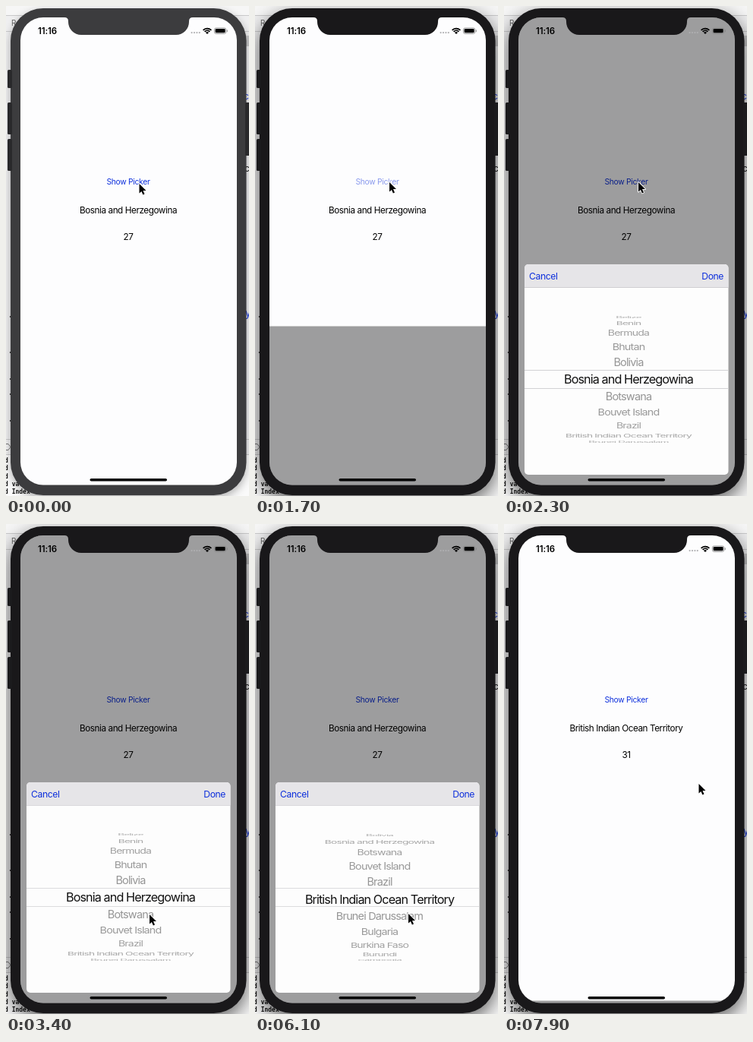
Recreate the animation shown at these times as an HTML page with a canvas. Size 320 by 645 pixels, loop 8 s.

```html
<!DOCTYPE html>
<html lang="en">
<head>
<meta charset="utf-8">
<title>Country picker</title>
<style>
  html, body { margin: 0; width: 100%; height: 100%; overflow: hidden; background: #eee; }
  canvas { display: block; width: 320px; height: 645px; }
</style>
</head>
<body>
<canvas id="stage"></canvas>
<script>
const LOOP = 8000, W = 320, H = 645;
const SANS = 'Inter, "Open Sans", sans-serif', MONO = '"DejaVu Sans Mono", monospace';
const BLUE = '#0e30dc';
const canvas = document.getElementById('stage');
const ctx = canvas.getContext('2d');
const dpr = window.devicePixelRatio || 1;
canvas.width = W * dpr;
canvas.height = H * dpr;

const countries = ['Belize', 'Benin', 'Bermuda', 'Bhutan', 'Bolivia', 'Bosnia and Herzegowina',
  'Botswana', 'Bouvet Island', 'Brazil', 'British Indian Ocean Territory', 'Brunei Darussalam',
  'Bulgaria', 'Burkina Faso', 'Burundi', 'Cambodia'];
const FIRST = 5, LAST = 9;

// Keys are [time, ...values]
const pointerKeys = [[0, 175.5, 234], [1000, 175.5, 234], [1100, 177, 232], [2400, 177, 232],
  [3300, 189, 514], [4000, 189, 514], [4400, 194, 534], [6000, 202, 513], [6500, 202, 513],
  [7300, 272, 357], [7600, 272, 357], [7900, 256.5, 342]];
const scrollKeys = [[4500, 0], [6100, 3.89], [6300, 4]];
const buttonKeys = [[1500, 1], [1501, 0.3], [1600, 0.3], [1900, 1]];

function track(keys, t) {
  if (t <= keys[0][0]) return keys[0].slice(1);
  const i = keys.findIndex(k => k[0] > t);
  if (i < 0) return keys[keys.length - 1].slice(1);
  const a = keys[i - 1], b = keys[i];
  const u = (t - a[0]) / (b[0] - a[0]), e = u * u * (3 - 2 * u);
  return a.slice(1).map((v, j) => v + (b[j + 1] - v) * e);
}

// Remaining distance of a critically damped spring, from 1 to 0
function spring(ms, rate) {
  const x = Math.max(0, ms) / 1000 * rate;
  return (1 + x) * Math.exp(-x);
}

function sheetOffset(t) {
  return 616 * (t < 5000 ? spring(t - 1630, 17) : 1 - spring(t - 7658, 30));
}

function box(x, y, w, h, color, r = 0) {
  ctx.fillStyle = color;
  ctx.beginPath();
  ctx.roundRect(x, y, w, h, r);
  ctx.fill();
}

function text(str, x, y, size, color, { align = 'center', weight = 400, track = -0.035, font = SANS } = {}) {
  ctx.font = `${weight} ${size}px ${font}`;
  ctx.letterSpacing = size * track + 'px';
  ctx.textAlign = align;
  ctx.fillStyle = color;
  ctx.fillText(str, x, y + size * 0.36);
}

function clipped(shape, draw, rule = 'nonzero') {
  ctx.save();
  ctx.beginPath();
  shape();
  ctx.clip(rule);
  draw();
  ctx.restore();
}

function desktop() {
  box(0, 0, W, H, '#efeff0');
  box(0, 0, W, 12, '#f6f6f6');
  for (const y of [12, 33, 570, 590]) box(0, y, W, 1, '#c9c9ca');
  box(0, 591, W, 54, '#fafafa');
  text('R', 10, 22, 10, '#666');
  box(316, 39, 4, 14, '#c8c8c9');
  const right = { align: 'left' };
  text('cl', 313, 119, 12, BLUE, right);
  text('c', 314, 214, 12, '#111', right);
  text('y', 315, 404, 13, BLUE, right);
  for (const y of [408, 455, 490, 510, 545]) box(5, y, 2, 2, '#444');
  ctx.strokeStyle = '#777';
  ctx.beginPath();
  ctx.moveTo(0, 576.5);
  ctx.lineTo(3, 576.5);
  ctx.lineTo(6, 580.5);
  ctx.lineTo(3, 584.5);
  ctx.lineTo(0, 584.5);
  ctx.stroke();
  ['d', 'd', 'd', 'd va', 'd Index'].forEach((line, i) =>
    text(line, -2, 598 + i * 10.4, 8, '#111', { align: 'left', weight: 700, track: 0, font: MONO }));
}

function phoneBody(active) {
  const color = active ? '#19181a' : '#3c3c3e';
  const keys = active ? '#1b1b1d' : '#29292b';
  ctx.save();
  ctx.shadowColor = active ? 'rgba(0,0,0,.62)' : 'rgba(0,0,0,.3)';
  ctx.shadowBlur = (active ? 26 : 12) * dpr;
  ctx.shadowOffsetY = (active ? 9 : 4) * dpr;
  box(6, 3, 310.5, 641, color, 43);
  ctx.restore();
  box(2, 84, 6, 24, keys, 1.5);
  box(2, 127, 6, 42, keys, 1.5);
  box(2, 175, 6, 42, keys, 1.5);
  box(315, 127, 6, 70, keys, 1.5);
  return color;
}

function notch(color) {
  ctx.fillStyle = color;
  ctx.beginPath();
  ctx.moveTo(77, 14);
  ctx.lineTo(77, 15);
  ctx.quadraticCurveTo(82, 15, 82, 20);
  ctx.arcTo(82, 38, 98, 38, 17);
  ctx.arcTo(241, 38, 241, 20, 17);
  ctx.lineTo(241, 20);
  ctx.quadraticCurveTo(241, 15, 246, 15);
  ctx.lineTo(246, 14);
  ctx.fill();
}

function statusBar() {
  text('11:16', 54.5, 32.5, 11.5, '#000', { weight: 600, track: -0.01 });
  for (let i = 0; i < 4; i++) box(243.5 + i * 3.4, 34, 2.2, 2.2, '#b0b0b2', 1.1);
  ctx.strokeStyle = '#000';
  ctx.lineWidth = 1.7;
  for (const r of [4.6, 7.4]) {
    ctx.beginPath();
    ctx.arc(265, 37, r, -Math.PI * 0.76, -Math.PI * 0.24);
    ctx.stroke();
  }
  ctx.fillStyle = '#000';
  ctx.beginPath();
  ctx.moveTo(265, 37);
  ctx.arc(265, 37, 2.8, -Math.PI * 0.76, -Math.PI * 0.24);
  ctx.fill();
  ctx.lineWidth = 0.8;
  ctx.strokeStyle = '#888';
  ctx.beginPath();
  ctx.roundRect(274.4, 28.9, 15.4, 7.6, 2.3);
  ctx.stroke();
  box(275.6, 30.1, 13, 5.2, '#000', 1.2);
  box(290.7, 31.2, 1, 3, '#888', 0.5);
}

function wheelRows(scroll, magnified) {
  countries.forEach((name, i) => {
    const angle = (i - FIRST - scroll) * 0.271;
    const c = Math.cos(angle);
    if (Math.abs(angle) > 1.5) return;
    const scale = magnified ? 1 : 0.896 * (1 - 0.104 * (1 - c));
    ctx.save();
    ctx.translate(164, 491.5 + 84 * Math.sin(angle));
    ctx.scale(scale, scale * c);
    const color = magnified ? '#111' : `rgba(0,0,0,${0.28 + 0.14 * c})`;
    text(name, 0, 0, 16.2, color, { track: -0.056 });
    ctx.restore();
  });
}

function pickerCard(scroll) {
  clipped(() => ctx.roundRect(27, 340, 268.5, 277, 5), () => {
    box(27, 340, 269, 277, '#fdfdfd');
    box(27, 340, 269, 30, '#e6e5e8');
    box(27, 370, 269, 0.8, '#cfced2');
    text('Cancel', 33, 355.5, 12.2, BLUE, { align: 'left' });
    text('Done', 289, 355.5, 12.2, BLUE, { align: 'right' });
    const band = () => ctx.rect(27, 479.5, 269, 24);
    clipped(() => { ctx.rect(27, 371, 269, 246); band(); }, () => wheelRows(scroll, false), 'evenodd');
    clipped(band, () => wheelRows(scroll, true));
    box(27, 479, 269, 0.8, '#d2d2d4');
    box(27, 503, 269, 0.8, '#d2d2d4');
  });
}

function screen(t) {
  box(19, 15, 285, 616, '#fdfdfe');
  ctx.globalAlpha = track(buttonKeys, t)[0];
  text('Show Picker', 161, 231, 10.3, BLUE, { track: -0.028 });
  ctx.globalAlpha = 1;
  const chosen = t < 6400 ? FIRST : LAST;
  text(countries[chosen], 161, 268.5, 11.7, '#000');
  text(String(22 + chosen), 161, 303.5, 11.7, '#000');

  const offset = sheetOffset(t);
  if (offset < 615.9) {
    ctx.save();
    ctx.translate(0, offset);
    box(19, 15, 285, 616, 'rgba(0,0,0,.38)');
    pickerCard(track(scrollKeys, t)[0]);
    ctx.restore();
  }
  statusBar();
  box(110.5, 622, 101.5, 3.6, '#000', 1.8);
}

function pointer(x, y) {
  const shape = [[0, 0], [0, 12.6], [2.9, 9.9], [4.9, 14.4], [7, 13.5], [5, 9.1], [9, 9.1]];
  ctx.beginPath();
  shape.forEach(([dx, dy]) => ctx.lineTo(x + dx, y + dy));
  ctx.closePath();
  ctx.lineJoin = 'round';
  ctx.lineWidth = 1.8;
  ctx.strokeStyle = '#fff';
  ctx.stroke();
  ctx.fillStyle = '#000';
  ctx.fill();
}

function draw(t) {
  ctx.setTransform(dpr, 0, 0, dpr, 0, 0);
  ctx.lineWidth = 1;
  desktop();
  const color = phoneBody(t >= 1500);
  clipped(() => ctx.roundRect(19, 15, 285, 615.5, 30), () => screen(t));
  notch(color);
  pointer(...track(pointerKeys, t));
}

const start = performance.now();
function frame() {
  draw((performance.now() - start) % LOOP);
  requestAnimationFrame(frame);
}
frame();
</script>
</body>
</html>
```
